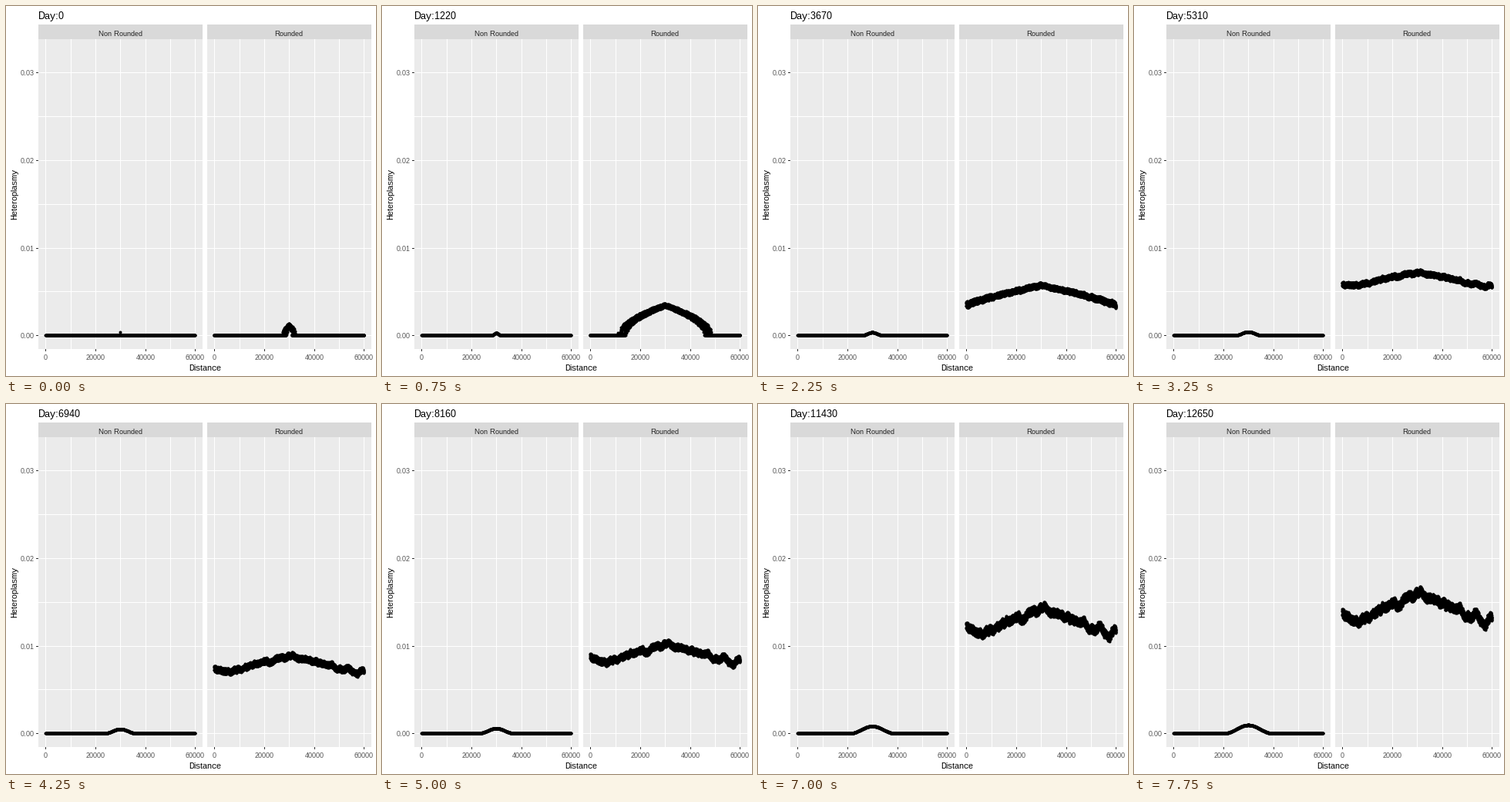
Write a matplotlib script that moves like this. It is 480 px wide and 480 px high and loops after 8 s.

```python
import numpy as np
import matplotlib.pyplot as plt
from matplotlib.animation import FuncAnimation
from matplotlib.patches import Rectangle

plt.rcParams.update({
    "font.family": "Liberation Sans",
    "text.hinting": "native",
    "text.hinting_factor": 1,
})

SIZE, DPI = 480, 72
FRAMES, INTERVAL = 32, 250
DAYS_PER_FRAME = 20000 / 49

# Panel geometry in pixels; distance in thousands, heteroplasmy in thousandths
PANELS = ((42, "Non Rounded"), (261, "Rounded"))
PANEL_W, STRIP_TOP, TOP, BOTTOM = 213, 24, 43, 445
X_PAD, X_SCALE = 9.2, 194 / 60
Y_ZERO, Y_SCALE = 427.2, 11.36


def px(left, dist):
    return left + X_PAD + dist * X_SCALE


def py(level):
    return Y_ZERO - level * Y_SCALE


fig = plt.figure(figsize=(SIZE / DPI, SIZE / DPI), dpi=DPI, facecolor="white")
ax = fig.add_axes([0, 0, 1, 1])
ax.set_xlim(0, SIZE)
ax.set_ylim(SIZE, 0)
ax.axis("off")


def box(x, y, w, h, color):
    ax.add_patch(Rectangle((x, y), w, h, fc=color, lw=0, antialiased=False))


def label(x, y, text, size, color="black", **kw):
    kw = {"va": "baseline", **kw}
    return ax.text(x, y, text, fontsize=size, color=color, **kw)


def draw_panel(left, name):
    box(left, STRIP_TOP, PANEL_W, TOP - STRIP_TOP, "#D9D9D9")
    label(left + PANEL_W / 2 - 0.5, 39, name, 9, "#1A1A1A", ha="center")
    box(left, TOP, PANEL_W, BOTTOM - TOP, "#EBEBEB")
    for level in range(0, 31, 5):
        box(left, round(py(level)), PANEL_W, 1, "white")
    for dist in range(0, 61, 10):
        x = round(px(left, dist))
        box(x, TOP, 1, BOTTOM - TOP, "white")
        if dist % 20 == 0:
            box(x, BOTTOM, 1, 3, "#333333")
            label(x, 459, str(dist * 1000), 9, "#4D4D4D", ha="center")


for left, name in PANELS:
    draw_panel(left, name)

for level in range(0, 31, 10):
    y = round(py(level))
    box(39, y, 3, 1, "#333333")
    label(37, y + 4, f"{level / 1000:.2f}", 9, "#4D4D4D", ha="right")

label(258, 473, "Distance", 11, ha="center")
label(11.5, 244, "Heteroplasmy", 11, rotation=90, ha="center", va="center")
title = label(42, 17, "", 13)


def dots():
    return ax.plot([], [], "o", color="black", ms=4, mew=0, antialiased=False)[0]


plain, rounded = dots(), dots()

# Fixed scatter of the rounded population
rng = np.random.default_rng(7)
flat_x = np.linspace(0, 60, 601)
dist = np.linspace(0, 60, 2600)
spread = rng.uniform(-1, 1, dist.size)
grain = np.interp(dist, np.arange(0, 61, 0.8), rng.uniform(-1, 1, 77))

# Late frames: a dome with a few lasting bumps (place, width, relative height)
BUMPS = ((0, 3, 0.09), (23, 2, -0.04), (31, 1.5, 0.025),
         (47, 2, 0.035), (53.5, 2, 0.06), (60, 1.5, 0.08))
FRONT_END, DOME_START = 9, 13


def ramp(n, start, end):
    return np.clip((n - start) / (end - start), 0, 1)


def front(n):
    """Wave spreading from the middle at constant speed."""
    reach = 1.9 + 5.1 * n + spread * min(0.9 + 0.28 * n, 2.3)
    return 0.83 * np.sqrt(np.maximum(reach - np.abs(dist - 30), 0))


def dome(n):
    """Slowly accelerating rise once the front has left the panel."""
    k = n - DOME_START
    shape = 1 + 0.12 * np.cos(np.pi * (dist - 30) / 30)
    for place, width, height in BUMPS:
        bump = height * np.exp(-((dist - place) / width) ** 2)
        shape += bump * ramp(n, FRONT_END, 20)
    return (6.35 + 0.34 * k + 0.005 * k * k) * shape


def rounded_level(n):
    late = ramp(n, FRONT_END, DOME_START)
    level = front(n) * (1 - late) + dome(n) * late
    noise = (0.013 * n + 0.1 * late) * spread + 0.009 * n * grain
    return np.where(level > 0, np.maximum(level + noise, 0), 0)


def plain_level(n):
    if n == 0:
        return np.where(np.abs(flat_x - 30) < 0.05, 0.38, 0)
    width = 0.87 * n ** 0.7
    off = np.clip((flat_x - 30) / width, -1, 1)
    return 0.22 * np.exp(0.047 * n) * np.cos(off * np.pi / 2) ** 2


def update(n):
    title.set_text(f"Day:{round(n * DAYS_PER_FRAME / 10) * 10}")
    plain.set_data(px(PANELS[0][0], flat_x), py(plain_level(n)))
    rounded.set_data(px(PANELS[1][0], dist), py(rounded_level(n)))
    return title, plain, rounded


anim = FuncAnimation(fig, update, frames=FRAMES, interval=INTERVAL,
                     repeat=True, repeat_delay=0)
plt.show()
```
